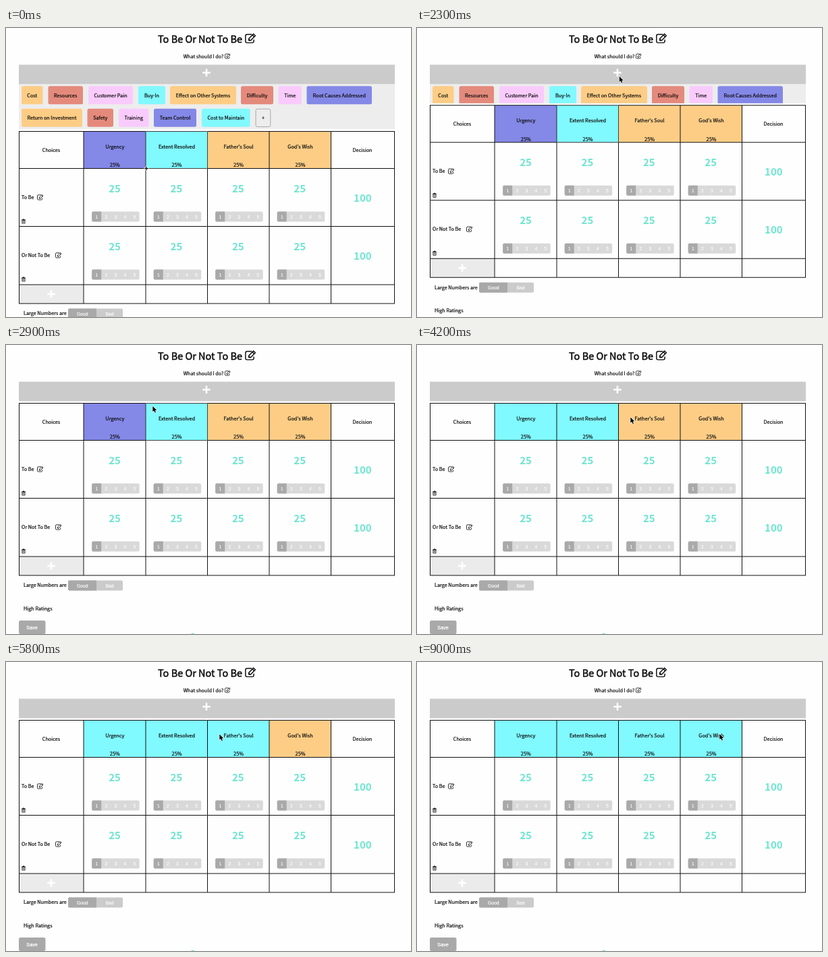
These frames come from a looping animation (600 by 429 pixels, 9.1 s). An HTML page with a canvas:

```html
<!DOCTYPE html>
<html lang="en">
<head>
<meta charset="utf-8">
<title>Decision matrix</title>
<style>
html, body { margin: 0; width: 100%; height: 100%; overflow: hidden; background: #fefefe; }
canvas { display: block; width: 600px; height: 429px; }
</style>
</head>
<body>
<canvas id="stage"></canvas>
<script>
const canvas = document.getElementById('stage');
const ctx = canvas.getContext('2d');
const dpr = window.devicePixelRatio || 1;
canvas.width = 600 * dpr;
canvas.height = 429 * dpr;

const LOOP = 9100, STEP = 100;
const SANS = '"Source Sans Pro", "Noto Sans CJK JP", "Noto Sans CJK SC", "Noto Sans CJK", "Open Sans", sans-serif';
const ARIAL = '"Liberation Sans", Arial, sans-serif';
const ORANGE = '#fdcd86', RED = '#e48a7c', PINK = '#f9cbfc', PURPLE = '#8488e6', CYAN = '#80f9ff';
const DARK = '#a9a9a9', MID = '#cbcbcb', PALE = '#d9d9d9', TEAL = '#6ee5d0', INK = '#0a0a0a';

const COLS = [19.5, 115, 207, 298.5, 390, 481.5, 575.5];
const ROWS = [86.5, 141.5, 227.5, 314, 342];
const CYCLE = [ORANGE, RED, PINK, PURPLE, CYAN];

// Each click advances a criterion by one colour
const CRITERIA = [
  { name: 'Urgency', first: 3, clicks: [3400] },
  { name: 'Extent Resolved', first: 4, clicks: [] },
  { name: "Father's Soul", first: 0, clicks: [4500, 4800, 5100, 5400] },
  { name: "God's Wish", first: 0, clicks: [7100, 7700, 8200, 8700] }
];

const CHIPS = [
  ['Cost', 23, 54.5, 0, ORANGE], ['Resources', 62.5, 114, 0, RED],
  ['Customer Pain', 122, 188, 0, PINK], ['Buy-In', 196, 236, 0, CYAN],
  ['Effect on Other Systems', 243, 341, 0, ORANGE], ['Difficulty', 348, 396, 0, RED],
  ['Time', 403.5, 438, 0, PINK], ['Root Causes Addressed', 445.5, 542, 0, PURPLE],
  ['Return on Investment', 23, 113, 1, ORANGE], ['Safety', 120.5, 159, 1, RED],
  ['Training', 167, 211.5, 1, PINK], ['Team Control', 219, 282, 1, PURPLE],
  ['Cost to Maintain', 290, 361.5, 1, CYAN]
];

// time, x, y of the pointer tip
const PATH = [
  [300, 208, 207], [1700, 299.5, 71.5], [2400, 299.5, 71.5], [2900, 217, 90.5],
  [3200, 186, 107], [3700, 186, 107], [4200, 316, 107], [6100, 316, 107],
  [6800, 448, 106.5], [LOOP, 448, 106.5]
];

function rect(x, y, w, h, color) {
  ctx.fillStyle = color;
  ctx.fillRect(x, y, w, h);
}

function round(x, y, w, h, r, color) {
  ctx.fillStyle = color;
  ctx.beginPath();
  ctx.roundRect(x, y, w, h, r);
  ctx.fill();
}

// Text placed by the middle of its capitals
function label(str, x, y, opt = {}) {
  const { size = 7.25, color = INK, align = 'center', weight = 500, font = SANS, fat = 0.2 } = opt;
  ctx.font = `${weight} ${size}px ${font}`;
  ctx.textAlign = align;
  ctx.fillStyle = ctx.strokeStyle = color;
  const base = y + size * 0.365;
  ctx.fillText(str, x, base);
  if (fat) {
    ctx.lineWidth = fat;
    ctx.lineJoin = 'round';
    ctx.strokeText(str, x, base);
  }
}

function plus(x, y, size, width, color) {
  rect(x - size / 2, y - width / 2, size, width, color);
  rect(x - width / 2, y - size / 2, width, size, color);
}

function line(x1, y1, x2, y2) {
  ctx.beginPath();
  ctx.moveTo(x1, y1);
  ctx.lineTo(x2, y2);
  ctx.stroke();
}

function poly(points) {
  ctx.beginPath();
  points.forEach(([x, y]) => ctx.lineTo(x, y));
  ctx.closePath();
}

// Square with a pencil, drawn on a 16 unit grid
function editIcon(x, y, size) {
  ctx.save();
  ctx.translate(x, y);
  ctx.scale(size / 16, size / 16);
  ctx.strokeStyle = ctx.fillStyle = INK;
  ctx.lineWidth = 1.4;
  ctx.lineJoin = 'round';
  ctx.beginPath();
  ctx.moveTo(10, 2.2);
  ctx.lineTo(3, 2.2);
  ctx.quadraticCurveTo(0.8, 2.2, 0.8, 4.4);
  ctx.lineTo(0.8, 12);
  ctx.quadraticCurveTo(0.8, 14.2, 3, 14.2);
  ctx.lineTo(10.6, 14.2);
  ctx.quadraticCurveTo(12.8, 14.2, 12.8, 12);
  ctx.lineTo(12.8, 9.6);
  ctx.stroke();
  poly([[5.6, 8.2], [12.3, 1.5], [15, 4.2], [8.3, 10.9], [5.6, 10.9]]);
  ctx.stroke();
  line(10.8, 3, 13.5, 5.7);
  poly([[5.6, 8.2], [8.3, 10.9], [5.6, 10.9]]);
  ctx.fill();
  ctx.restore();
}

function trashIcon(x, y) {
  ctx.strokeStyle = INK;
  ctx.lineWidth = 0.75;
  line(x, y + 1.5, x + 6, y + 1.5);
  ctx.strokeRect(x + 2, y + 0.4, 2, 1.1);
  ctx.strokeRect(x + 0.9, y + 1.5, 4.2, 5.1);
  ctx.lineWidth = 0.5;
  for (const dx of [2.1, 3, 3.9]) line(x + dx, y + 2.8, x + dx, y + 5.5);
}

function rating(x, y) {
  round(x, y, 70.5, 15, 2, PALE);
  round(x, y, 14, 15, [2, 0, 0, 2], DARK);
  for (let i = 0; i < 5; i++) {
    label(String(i + 1), x + 7.2 + i * 14, y + 7.6, { size: 6.7, color: '#fff', font: ARIAL, weight: 400, fat: 0.1 });
  }
}

function panel(height) {
  ctx.save();
  ctx.beginPath();
  ctx.rect(19, 83.5, 557, height);
  ctx.clip();
  rect(19, 83.5, 557, 67, '#ededed');
  for (const [name, x1, x2, row, color] of CHIPS) {
    const y = 86.3 + row * 33.5;
    round(x1, y, x2 - x1, 27, 2.5, color);
    label(name, (x1 + x2) / 2, y + 13.8);
  }
  ctx.strokeStyle = '#999';
  ctx.lineWidth = 0.8;
  ctx.beginPath();
  ctx.roundRect(370, 120.2, 21.8, 26.4, 2.5);
  ctx.stroke();
  label('+', 381, 133.4);
  ctx.restore();
}

function colorAt(c, t) {
  return CYCLE[c.first + c.clicks.filter(at => t >= at).length];
}

function table(t) {
  const [top, r1, r2, r3, end] = ROWS;
  CRITERIA.forEach((c, i) => {
    rect(COLS[i + 1], top, COLS[i + 2] - COLS[i + 1], r1 - top, colorAt(c, t));
  });
  rect(COLS[0], r3, COLS[1] - COLS[0], end - r3, '#ebebeb');
  plus(67, 328, 11.5, 2.6, '#fff');

  ctx.strokeStyle = '#111';
  ctx.lineWidth = 1;
  for (const x of COLS) line(x, top, x, end);
  for (const y of ROWS) line(COLS[0] - 0.5, y, COLS[6] + 0.5, y);

  // Dotted focus ring of the active heading
  const active = t < 3400 ? 1 : t >= 7100 && t < 8900 ? 3 : -1;
  if (active >= 0) {
    const x = COLS[active + 1];
    ctx.save();
    ctx.strokeStyle = 'rgba(255,255,255,0.4)';
    ctx.setLineDash([1, 1]);
    ctx.strokeRect(x, top, COLS[active + 2] - x, r1 - top);
    ctx.restore();
  }

  label('Choices', 67, 114);
  label('Decision', 528, 114);
  CRITERIA.forEach((c, i) => {
    const x = (COLS[i + 1] + COLS[i + 2]) / 2 + 0.3;
    label(c.name, x, 109.4, { size: 7.35 });
    label('25%', x, 136.6, { size: 7.35 });
  });

  [['To Be', 46], ['Or Not To Be', 73]].forEach(([name, iconX], i) => {
    const y = [r1, r2][i];
    label(name, 23, y + 43, { align: 'left' });
    editIcon(iconX, y + 38, 9.6);
    trashIcon(23, y + 75);
    for (let k = 0; k < 4; k++) {
      label('25', 161 + k * 91.4, y + 29.8, { size: 15, color: TEAL, weight: 700, fat: 0 });
      rating(127.2 + k * 91.5, y + 64);
    }
    label('100', 528.3, y + 44, { size: 15, color: TEAL, weight: 700, fat: 0 });
  });
}

function footer() {
  const white = { size: 6.8, color: '#fff', font: ARIAL, weight: 400, fat: 0.15 };
  label('Large Numbers are', 26, 356.6, { align: 'left' });
  round(92, 349.5, 81, 15, 2, MID);
  round(92, 349.5, 42, 15, [2, 0, 0, 2], DARK);
  label('Good', 113.3, 357.3, white);
  label('Bad', 153.5, 357.3, white);
  label('High Ratings', 26, 391.3, { align: 'left' });
  round(19, 409, 39.5, 20, 2.5, DARK);
  label('Save', 38.6, 419.2, { ...white, size: 7.3, fat: 0.25 });
  ctx.fillStyle = TEAL;
  ctx.beginPath();
  ctx.arc(276.7, 432, 4.2, 0, 7);
  ctx.fill();
}

const swing = p => 0.5 - Math.cos(Math.PI * Math.min(1, Math.max(0, p))) / 2;

function pointerAt(t) {
  let [t0, x0, y0] = PATH[0];
  for (const [t1, x1, y1] of PATH) {
    if (t <= t1) {
      const k = t1 > t0 ? swing((t - t0) / (t1 - t0)) : 0;
      return [x0 + (x1 - x0) * k, y0 + (y1 - y0) * k];
    }
    [t0, x0, y0] = [t1, x1, y1];
  }
  return [x0, y0];
}

function pointer(t) {
  if (t < 300) {
    plus(208, 208.5, 7, 2.6, '#fff');
    plus(208, 208.5, 5.6, 1.2, '#000');
    return;
  }
  const [x, y] = pointerAt(t);
  ctx.save();
  ctx.translate(x, y);
  poly([[0.3, 0.2], [0.3, 8.6], [2.2, 6.9], [3.6, 10], [5, 9.4], [3.7, 6.4], [6.2, 6.2]]);
  ctx.lineWidth = 1.3;
  ctx.lineJoin = 'round';
  ctx.strokeStyle = '#fff';
  ctx.stroke();
  ctx.fillStyle = '#000';
  ctx.fill();
  ctx.restore();
}

function draw(t) {
  ctx.setTransform(dpr, 0, 0, dpr, 0, 0);
  rect(0, 0, 600, 429, '#fefefe');
  label('To Be Or Not To Be', 225, 16.7, { size: 14.5, align: 'left', fat: 0.45 });
  editIcon(354, 7.3, 16.4);
  label('What should I do?', 262.7, 42, { align: 'left' });
  editIcon(324, 37.4, 8.8);
  rect(19, 54.5, 557, 29, MID);
  plus(297, 66.3, 11.5, 2.6, '#fff');

  const open = 67 * (1 - swing((t - 2080) / 400));
  if (open > 0.2) panel(open);
  ctx.save();
  ctx.translate(0, open);
  table(t);
  footer();
  ctx.restore();
  pointer(t);
}

const start = performance.now();
function tick(now) {
  const t = Math.max(0, now - start) % LOOP;
  draw(Math.floor(t / STEP) * STEP);
  requestAnimationFrame(tick);
}
draw(0);
requestAnimationFrame(tick);
</script>
</body>
</html>
```
